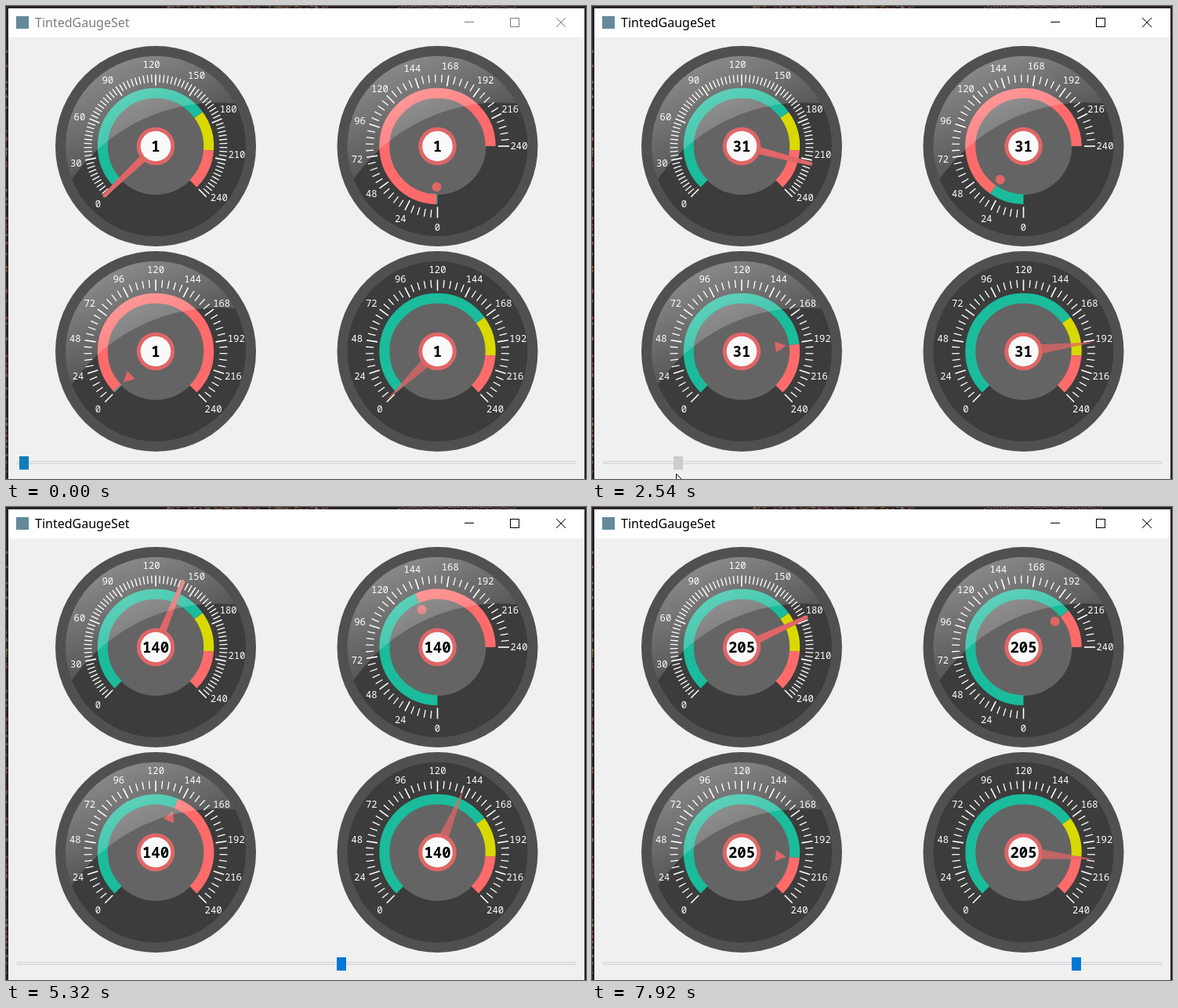
Write an HTML page with a canvas that moves like this. It is 740 px wide and 604 px high and loops after 8000 ms.

```html
<!DOCTYPE html>
<html lang="en">
<head>
<meta charset="utf-8">
<title>Gauges</title>
<style>
  html, body { margin: 0; width: 740px; height: 604px; overflow: hidden; }
  canvas { display: block; }
</style>
</head>
<body>
<canvas id="stage" width="740" height="604"></canvas>
<script>
const ctx = document.getElementById('stage').getContext('2d');
const LOOP = 8000, MAX = 240, SWEEP = 270;
const TEAL = '#1abc9c', YELLOW = '#d9d900', RED = '#ff6b6b', POINTER = '#e06666';
const MONO = '"Noto Sans Mono", "DejaVu Sans Mono", monospace';
const rad = deg => deg * Math.PI / 180;
const lerp = (a, b, p) => a + (b - a) * p;
const clamp = p => Math.max(0, Math.min(1, p));

// Slider moves: when the quick and the slow pointers set off, and the new value.
const moves = [
  { quick: 822, slow: 868, value: 240 },
  { quick: 2438, slow: 2441, value: 31 },
  { quick: 3749, slow: 3762, value: 140 },
  { quick: 5930, slow: 5930, value: 0 },
  { quick: 6944, slow: 6995, value: 205 },
];
const DURATION = { quick: 870, slow: 1480 };
const DRAG = 60, RELEASE = 130, ACTIVATED = 770;

// time, x, y of the mouse pointer
const mousePath = [
  [0, 75, 612], [300, 68, 603], [540, 24, 583], [762, 24, 583], [822, 720, 585],
  [950, 724, 612], [2200, 728, 612], [2330, 721, 586], [2378, 720, 586],
  [2438, 108, 592], [2540, 107, 597], [2640, 104, 612], [3500, 114, 612],
  [3620, 110, 586], [3689, 110, 586], [3749, 428, 586], [3900, 434, 612],
  [5780, 430, 612], [5870, 428, 586], [5930, 21, 586], [6100, 24, 612],
  [6760, 24, 612], [6850, 21, 586], [6884, 21, 586], [6944, 618, 584],
  [7080, 620, 583], [7230, 641, 575], [7400, 690, 612], [LOOP, 690, 612],
];

// Ease-out swing; a new move starts from wherever the pointer is.
function swing(t, kind) {
  let from = 1, to = 1, begin = 0;
  const at = time => {
    const left = 1 - clamp((time - begin) / DURATION[kind]);
    return lerp(from, to, 1 - left * left);
  };
  for (const move of moves) {
    if (t < move[kind]) break;
    from = at(move[kind]);
    to = move.value;
    begin = move[kind];
  }
  return at(t);
}

function sliderValue(t) {
  return Math.round(moves.reduce(
    (v, m) => lerp(v, m.value, clamp((t - m.quick + DRAG) / DRAG)), 1));
}

function mouseAt(t) {
  const i = Math.max(1, mousePath.findIndex(p => p[0] > t));
  const [t0, x0, y0] = mousePath[i - 1], [t1, x1, y1] = mousePath[i];
  const p = (t - t0) / (t1 - t0);
  return [lerp(x0, x1, p), lerp(y0, y1, p)];
}

function disc(r, color, x = 0, y = 0) {
  ctx.fillStyle = color;
  ctx.beginPath();
  ctx.arc(x, y, r, 0, 7);
  ctx.fill();
}

function polygon(points) {
  ctx.beginPath();
  points.forEach(([x, y]) => ctx.lineTo(x, y));
  ctx.closePath();
}

function line(x0, y0, x1, y1) {
  ctx.beginPath();
  ctx.moveTo(x0, y0);
  ctx.lineTo(x1, y1);
  ctx.stroke();
}

function text(string, x, y, font, color, align = 'center') {
  ctx.font = font;
  ctx.fillStyle = color;
  ctx.textAlign = align;
  ctx.fillText(string, x, y);
}

const pointers = {
  bar() {
    ctx.lineWidth = 4;
    ctx.lineJoin = 'round';
    ctx.strokeStyle = ctx.fillStyle;
    polygon([[-3.5, 0], [3.5, 0], [0.3, -91], [-0.3, -91]]);
    ctx.fill();
    ctx.stroke();
  },
  dot() { disc(6, POINTER, 0, -52); },
  triangle() {
    polygon([[0, -57], [7, -43.5], [-7, -43.5]]);
    ctx.fill();
  },
  needle() {
    ctx.globalAlpha = 0.75;
    polygon([[-8, 0], [8, 0], [0, -91]]);
    ctx.fill();
    ctx.globalAlpha = 1;
  },
};

function glass() {
  ctx.save();
  ctx.rotate(rad(-25));
  const shine = ctx.createLinearGradient(0, -114, 0, 0);
  shine.addColorStop(0, 'rgba(255,255,255,.39)');
  shine.addColorStop(1, 'rgba(255,255,255,.12)');
  ctx.beginPath();
  ctx.arc(0, 0, 115, 0, 7);
  ctx.clip();
  ctx.beginPath();
  ctx.rect(-120, -120, 240, 240);
  ctx.moveTo(228, 190);
  ctx.arc(0, 190, 228, 0, 2 * Math.PI);
  ctx.fillStyle = shine;
  ctx.fill('evenodd');
  ctx.restore();
}

function gauge(g, value, shown) {
  const angle = v => g.start + v / MAX * SWEEP;
  ctx.save();
  ctx.translate(g.x, g.y);
  disc(128, '#505050');
  disc(115, '#3c3c3c');
  disc(62, '#646464');

  let from = 0;
  const bands = g.zones ? [[168, TEAL], [204, YELLOW], [MAX, RED]] : [[value, TEAL], [MAX, RED]];
  ctx.lineWidth = 13;
  for (const [to, color] of bands) {
    ctx.strokeStyle = color;
    ctx.beginPath();
    ctx.arc(0, 0, 67.7, rad(angle(from) - 90), rad(angle(to) - 90));
    if (to > from) ctx.stroke();
    from = to;
  }

  ctx.strokeStyle = '#fff';
  const ticks = g.majors * g.minors;
  for (let i = 0; i <= ticks; i++) {
    const major = i % g.minors === 0;
    ctx.save();
    ctx.rotate(rad(g.start + SWEEP * i / ticks));
    ctx.lineWidth = major ? 1.6 : 1.3;
    line(0, -91.5, 0, major ? -77.5 : -81.5);
    ctx.restore();
  }
  // Labels advance by whole degrees, so they drift on the eight-part dial.
  const labelStep = Math.floor(SWEEP / g.majors);
  for (let i = 0; i <= g.majors; i++) {
    const a = rad(g.start + labelStep * i);
    text(i * MAX / g.majors, 104 * Math.sin(a), -104 * Math.cos(a) + 4.3,
      '500 12.2px ' + MONO, '#fff');
  }

  ctx.save();
  ctx.rotate(rad(angle(value)));
  ctx.fillStyle = POINTER;
  pointers[g.pointer]();
  ctx.restore();
  disc(24.3, POINTER);
  disc(19.3, '#fafafa');
  text(shown, 0, 7, 'bold 19px ' + MONO, '#000');
  if (g.glass) glass();
  ctx.restore();
}

const gauges = [
  { x: 191, y: 179, start: -135, majors: 8, minors: 10, pointer: 'bar', zones: true, glass: true, kind: 'slow' },
  { x: 550.5, y: 179, start: -180, majors: 10, minors: 5, pointer: 'dot', glass: true },
  { x: 191, y: 441, start: -135, majors: 10, minors: 5, pointer: 'triangle', glass: true, kind: 'quick' },
  { x: 550.5, y: 441, start: -135, majors: 10, minors: 5, pointer: 'needle', zones: true, kind: 'quick' },
];

// Dark editor peeking out around the window
function backdrop() {
  ctx.fillStyle = '#292226';
  ctx.fillRect(0, 0, 740, 604);
  let seed = 7;
  const random = () => (seed = seed * 16807 % 2147483647) / 2147483647;
  const tints = ['#8a5a34', '#8d3f4c', '#77733f', '#6d6a6c'];
  for (let i = 0; i < 60; i++) {
    ctx.fillStyle = tints[i % 4];
    ctx.fillRect(205 + random() * 205, random() * 2, 2 + random() * 3, 1);
    ctx.fillRect(0, 55 + random() * 540, 1 + random(), 3);
  }
  ctx.fillStyle = '#77666c';
  for (let x = 500; x < 650; x += 4) ctx.fillRect(x, random() * 2, 3, 1);
}

function windowFrame(active) {
  ctx.fillStyle = '#f0f0f0';
  ctx.fillRect(3, 3, 735, 601);
  ctx.fillStyle = '#fff';
  ctx.fillRect(3, 3, 735, 37);
  ctx.fillStyle = '#648a99';
  ctx.fillRect(13, 13, 16, 16);
  const ink = active ? '#000' : '#7c7c7c';
  text('TintedGaugeSet', 37, 27, '16px "Noto Sans", "Open Sans", sans-serif', ink, 'left');
  ctx.strokeStyle = ink;
  ctx.lineWidth = 1;
  line(585, 20.5, 597, 20.5);
  ctx.strokeRect(643.5, 15.5, 11, 11);
  line(702, 15, 714, 27);
  line(714, 15, 702, 27);
}

function slider(t, value, [mx, my]) {
  ctx.fillStyle = '#e7eaea';
  ctx.strokeStyle = '#d6d6d6';
  ctx.lineWidth = 1;
  ctx.fillRect(14, 581, 713, 4);
  ctx.strokeRect(14.5, 581.5, 712, 3);
  const x = Math.round(20 + value * 35 / 12);
  const pressed = moves.some(m => t >= m.quick - DRAG && t < m.quick + RELEASE);
  const hover = Math.abs(mx - x) < 7 && my > 574 && my < 592;
  ctx.fillStyle = pressed ? '#cccccc' : hover ? '#171717' : t < ACTIVATED ? '#117dbb' : '#0078d7';
  ctx.fillRect(x - 6, 575, 12, 17);
}

function mouse([x, y]) {
  ctx.save();
  ctx.translate(Math.round(x) + 0.5, Math.round(y) + 0.5);
  polygon([[0, 0], [0, 23.5], [5.5, 18.5], [9.3, 27], [13, 25.4], [9.4, 17], [16.5, 16.5]]);
  ctx.fillStyle = '#fff';
  ctx.strokeStyle = '#000';
  ctx.lineWidth = 1;
  ctx.lineJoin = 'miter';
  ctx.fill();
  ctx.stroke();
  ctx.restore();
}

function draw(t) {
  const value = sliderValue(t), pointer = mouseAt(t);
  backdrop();
  windowFrame(t >= ACTIVATED);
  for (const g of gauges) gauge(g, g.kind ? swing(t, g.kind) : value, value);
  slider(t, value, pointer);
  mouse(pointer);
}

const startTime = performance.now();
function tick() {
  draw((performance.now() - startTime) % LOOP);
  requestAnimationFrame(tick);
}
tick();
</script>
</body>
</html>
```
